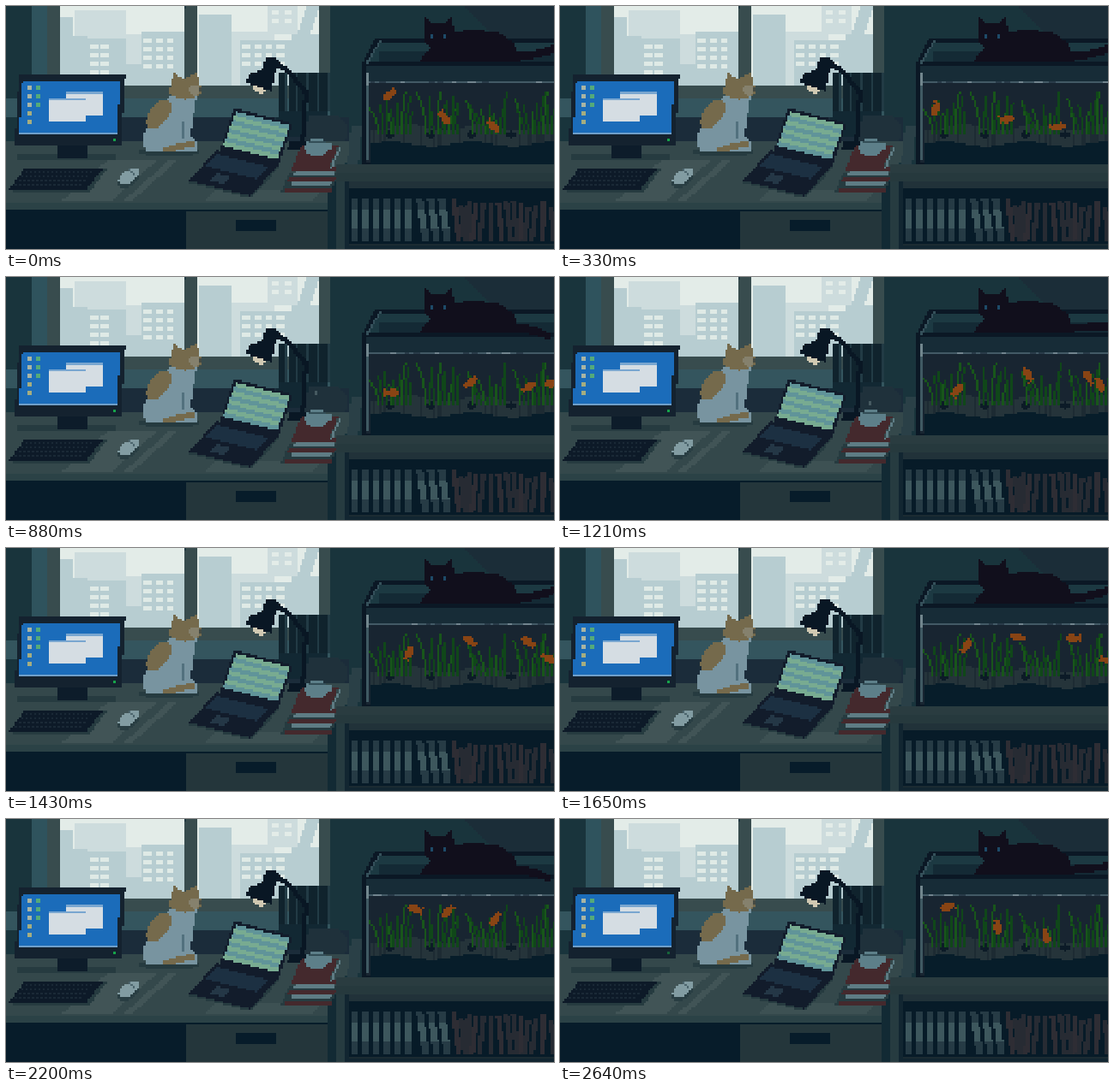
Animation of 639x284 px, one loop 2750 ms. Source, as an HTML page with a canvas:

```html
<!DOCTYPE html>
<html lang="en">
<meta charset="utf-8">
<title>Office cats</title>
<style>
  html, body { margin: 0; width: 100%; height: 100%; overflow: hidden; background: #19333c }
  canvas { display: block; width: 640px; height: 285px; image-rendering: pixelated }
</style>
<canvas width="256" height="114"></canvas>
<script>
const ctx = document.querySelector('canvas').getContext('2d');
const CELL = 2.5, STEP = 110, STEPS = 25, TAU = Math.PI * 2;
const snap = v => Math.round(v / CELL);
const noise = n => { const v = Math.sin(n * 12.9898) * 43758.5453; return v - Math.floor(v); };
const repeat = (n, draw) => { for (let k = 0; k < n; k++) draw(k); };

// Coordinates are stage pixels, snapped to the coarse pixel grid.
function box(color, x, y, w = CELL, h = CELL) {
  ctx.fillStyle = color;
  const left = snap(x), top = snap(y);
  ctx.fillRect(left, top, Math.max(1, snap(x + w) - left), Math.max(1, snap(y + h) - top));
}
function poly(color, ...p) {
  ctx.fillStyle = color;
  for (let row = 0; row < 114; row++) {
    const y = (row + .5) * CELL, hits = [];
    for (let k = 0; k < p.length; k += 2) {
      const x1 = p[k], y1 = p[k + 1], x2 = p[(k + 2) % p.length], y2 = p[(k + 3) % p.length];
      if ((y1 > y) !== (y2 > y)) hits.push(x1 + (y - y1) / (y2 - y1) * (x2 - x1));
    }
    hits.sort((a, b) => a - b);
    for (let k = 0; k + 1 < hits.length; k += 2) {
      const left = snap(hits[k]);
      ctx.fillRect(left, row, snap(hits[k + 1]) - left, 1);
    }
  }
}
// Parallelogram: the lower edge moves by lean, the right edge by drop.
function slab(color, x, y, w, h, lean, drop = 0) {
  poly(color, x, y, x + w, y + drop, x + w + lean, y + h + drop, x + lean, y + h);
}
function oval(color, x, y, rx, ry, angle = 0) {
  const c = Math.cos(angle), s = Math.sin(angle), points = [];
  for (let a = 0; a < TAU; a += TAU / 16) {
    const u = rx * Math.cos(a), v = ry * Math.sin(a);
    points.push(x + u * c - v * s, y + u * s + v * c);
  }
  poly(color, ...points);
}
function line(color, x1, y1, x2, y2, size = CELL) {
  const n = Math.ceil(Math.max(Math.abs(x2 - x1), Math.abs(y2 - y1)) / CELL);
  repeat(n + 1, k => box(color, x1 + (x2 - x1) * k / n, y1 + (y2 - y1) * k / n, size, size));
}
function building(color, x, y, w, cols = 0, rows = 0) {
  box(color, x, y, w, 92.5 - y);
  repeat(cols * rows, k => box('#dfeae6', x + 4 + k % cols * 13, y + 6 + Math.floor(k / cols) * 10, 9, 5));
}

function room() {
  const frame = '#384c4e', near = '#b7cdd1', far = '#cddcdd';
  box('#19343c', 0, 0, 640, 285);
  poly('#1b2d38', 535, 0, 640, 0, 640, 38, 572, 38);
  box('#2f535d', 30, 0, 18, 130);
  box(frame, 48, 0, 330, 108);
  box('#34555e', 0, 108, 378, 21);
  box('#1b2c3a', 130, 129, 270, 34);

  box('#e3ece8', 62.5, 0, 302.5, 92.5);
  building(far, 80, 5, 60);
  building(near, 62.5, 35, 32);
  box(near, 62.5, 12, 14, 25);
  building(near, 94, 38, 46, 2, 4);
  building(far, 140, 33, 18);
  building(near, 122, 67, 36);
  building(near, 157, 31, 51, 3, 4);
  building(far, 263, 31, 50);
  building(near, 225, 10, 38);
  building(near, 272, 40, 60, 4, 3);
  box(far, 305, 0, 35, 32);
  repeat(4, k => box('#e3ece8', 311 + k % 2 * 14, 6 + (k >> 1) * 10, 7, 5));
  building(near, 332, 32, 33);
  slab(near, 350, 0, 15, 32, -10);
  box(frame, 207.5, 0, 15, 100);
  box('#223942', 207.5, 0);

  // desk
  poly('#34484b', 0, 157, 415, 157, 385, 197, 376, 230, 0, 230);
  slab('#415456', 118, 180, 82, 48, -54);
  slab('#34484b', 176, 180, 14, 48, -54);
  slab('#3d5153', 245, 215, 125, 13, -14);
  slab('#2a4047', 402, 140, 13, 54, -5);
  box('#2b4246', 0, 229, 376, 8.5);
  box('#071c2a', 0, 237.5, 386, 48);
  box('#24363b', 210, 240, 165, 45);
  box('#071c2a', 267, 251, 48, 11);
  box('#122a34', 375, 205, 11, 80);
}

function computer(i) {
  box('#263b40', 13, 173, 114, 7);
  box('#0d1c2a', 59, 162, 36, 15);
  slab('#14222f', 15, 80, 124, 82, -5);
  slab('#1b6cba', 19, 87, 114, 62, -4);
  box('#6f9fca', 16, 148, 114);
  repeat(2, k => {
    const x = 70 - k * 20, y = 100 + k * 8;
    box('#79a6d0', x, y, 42, 28);
    box('#d5dde3', x, y + 3, 42, 25);
  });
  const palette = ['#a9b4a3', '#55aa79', '#b77b6c'];
  repeat(8, k => k < 6 ? box(palette[(k + (k >> 1)) % 3], 26 + k % 2 * 10, 93 + (k >> 1) * 10, 5, 5)
    : box('#a5ad80', 24, 123 + (k - 6) * 10, 5, 5));
  box(i % 5 < 4 ? '#16a34a' : '#17633a', 125, 156);

  slab('#263b40', 26, 191, 91, 26, -20);
  slab('#0d1a28', 22, 189, 91, 25, -19);
  repeat(64, k => box('#1a2936', 22 + k % 16 * 5 - (k >> 4) * 4, 192 + (k >> 4) * 5));
  oval('#293e43', 143, 202, 14, 8, -.6);
  oval('#829ca2', 143, 199, 14, 7, -.6);
  line('#4d666e', 143, 190, 148, 196);
}

function paleCat() {
  const white = '#7894a0', tan = '#756a4c';
  oval('#263b40', 190, 170, 36, 6);
  poly(white, 192, 104, 222, 104, 215, 150, 223, 161, 223, 169, 162, 169, 159, 153, 174, 120);
  oval(tan, 178, 126, 20, 11, -.95);
  oval(tan, 209, 98, 19, 11);
  poly(tan, 191, 96, 196, 77, 207, 86, 222, 77, 227, 96);
  oval('#85816d', 220, 98, 7, 6);
  box('#454a43', 225, 95, CELL, 5);
  line(tan, 182, 165, 213, 158, 6);
  line('#52717e', 204, 135, 206, 153);
}

function deskThings(i) {
  const dark = '#091724', cover = '#44292d', pages = '#5e7c84';
  repeat(5, k => {
    box('#10232d', 317 + k * 12, 77, 11, 48);
    box('#223b45', 326 + k * 12, 77, CELL, 46);
  });
  slab('#122833', 318, 123, 58, 30, -8);
  poly('#1f313b', 354, 127, 387, 127, 398, 140, 396, 157, 345, 157);

  // lamp
  line(dark, 311, 61, 330, 77, 5);
  line(dark, 328, 75, 348, 100, 5);
  line(dark, 347, 98, 343, 160, 5);
  oval('#d1c9b2', 295, 96, 8, 5, .4);
  poly(dark, 303, 61, 316, 61, 318, 70, 312, 82, 310, 100, 280, 89, 284, 79, 298, 74);
  slab(dark, 331, 157, 23, 11, -3);

  // laptop
  slab('#263b40', 245, 170, 74, 36, -34, 18);
  slab('#121c2b', 266, 119, 68, 50, -17, 18);
  slab('#121c2b', 245, 168, 72, 36, -32, 18);
  slab('#1c3042', 246, 173, 60, 14, -14, 15);
  slab('#243746', 246, 195, 16, 9, -8, 4);
  repeat(8, k => {
    const color = (k + (i % 5 > 2)) % 2 ? '#78ab91' : '#609499';
    slab(color, 268 - k * 1.9, 123 + k * 5, 63, 5, -1.9, 16);
  });

  // books and mug
  slab('#263b40', 330, 195, 58, 22, -10);
  repeat(3, k => {
    const y = 212 - k * 12, x = 326 + k * 4;
    slab(cover, x, y, 55, 5, -2);
    if (k) slab(pages, x + 3, y + 5, 47, 5, -2);
  });
  slab(cover, 345, 162, 43, 27, -12);
  slab(pages, 388, 165, CELL, 24, -10);
  oval('#5d7f89', 362, 165, 14, 11);
  box('#5d7f89', 375, 160, 5, 8);
  box('#334e57', 353, 157, 20);
  if (i > 6 && i < 13) box('#465a61', 361, 132 + (i - 8) * 4, CELL, 5);
}

// Positions at equal steps round a closed loop
const fishLoops = [
  [[447, 104], [437, 130], [460, 134], [474, 114], [477, 105]],
  [[511, 130], [529, 130], [546, 117], [533, 104], [515, 108]],
  [[568, 140], [591, 138], [617, 121], [598, 105], [570, 117]],
  [[665, 120], [650, 124], [630, 125], [638, 131], [660, 132]]
];
function along(loop, i) {
  const n = loop.length, s = (i / STEPS + 1) * n, k = Math.floor(s), u = s - k;
  const [a, b, c, d] = [-1, 0, 1, 2].map(o => loop[(k + o) % n]);
  return [0, 1].map(j => b[j] + u / 2 * (c[j] - a[j]
    + u * (2 * a[j] - 5 * b[j] + 4 * c[j] - d[j] + u * (3 * (b[j] - c[j]) + d[j] - a[j]))));
}
function fish(loop, i) {
  const color = '#884414', [x, y] = along(loop, i), [x2, y2] = along(loop, i + .3);
  const angle = Math.atan2(y2 - y, x2 - x), c = Math.cos(angle), s = Math.sin(angle);
  oval(color, x + c, y + s, 8, 4.5, angle);
  poly(color, x - 4 * c, y - 4 * s, x - 9 * c - 5 * s, y - 9 * s + 5 * c, x - 9 * c + 5 * s, y - 9 * s - 5 * c);
}

function tank(i) {
  const edge = '#0b1825';
  poly(edge, 415, 67, 431, 37, 640, 37, 640, 186, 415, 186);
  poly('#1c3942', 423, 65, 435, 42, 640, 42, 640, 65);
  box('#142a35', 436, 53, 204, 12);
  line('#35505a', 419, 66, 434, 40);
  box('#172c37', 420, 71, 220, 18);
  box('#182531', 420, 89, 220, 93);
  for (let x = 425; x < 640; x += CELL) {
    const top = 142 + 4 * Math.sin(x / 13), floor = 161 + 3 * Math.sin(x / 15);
    box(noise(x) < .25 ? '#1d2b33' : '#25343a', x, top, CELL, 40);
    box('#071d2a', x, floor, CELL, 184 - floor);
  }
  repeat(4, k => oval('#0c1b27', 448 + k * 47, 150, 6, 4));

  repeat(36, k => {
    const clump = Math.floor(k / 9), offset = k % 9 - 4;
    const x = 451 + clump * 55 + offset * 4.5, height = 20 + noise(k + 4) * 30;
    const bend = offset * 1.5 + (noise(k * 3) - .5) * 12;
    for (let h = 0; h < height; h += CELL) {
      const f = h / height, sway = Math.sin(i / 5 * TAU + k) * f * 1.3;
      box(k % 3 ? '#104719' : '#18561a', x + bend * f * f + sway, 148 - h);
    }
  });
  fishLoops.forEach(loop => fish(loop, i));

  box('#435a66', 421, 87.5, 219);
  repeat(10, k => box(k % 2 ? '#71848e' : '#293b49', 424 + (noise(k) * 210 + i * 5) % 210, 87.5, 7));
  box('#3f5962', 420, 78, CELL, 102);
  box('#71868d', 420, 78, CELL, 15);
}

function blackCat(i) {
  const fur = '#110f1c', swing = Math.cos(TAU * 2 * (i - 1.5) / STEPS);
  poly(fur, 488, 13, 496, 19, 511, 19, 519, 12, 523, 30, 545, 27, 575, 31, 592, 43, 601, 66, 480, 66, 494, 49, 488, 41);
  repeat(20, k => {
    const f = k / 19;
    box(fur, 585 + f * (48 + swing * 4), 54 - swing * 11 * f * f, 6, 10 - f * 2);
  });
  if (i % 10 !== 5) repeat(2, k => box('#1d4a68', 495 + k * 14, 32, CELL, 5));
}

function shelf() {
  box('#2a3c40', 385, 186, 255, 8);
  box('#26393d', 385, 194, 255, 11);
  box('#122631', 385, 205, 255, 80);
  box('#263b40', 386, 206, 9, 79);
  box('#071b28', 400, 213, 240, 64);
  box('#213239', 400, 206, 240, 7);
  box('#1b2b32', 400, 277, 240, 4);
  repeat(9, k => {
    const x = 402 + k * 12.7, lean = k > 5 ? 7 : 0;
    slab('#263b45', x, 226, 8, 48, lean);
    slab('#3d575d', x + lean * .25, 238, 8, 23, lean * .5);
  });
  repeat(14, k => {
    const top = 226 + noise(k) * 8, lean = Math.round(Math.cos(k * .9) * 6);
    slab(k % 3 ? '#272b33' : '#2e2d34', 519 + k * 8.7, top, 6, 274 - top, lean);
  });
}

let shown = -1;
function play(now) {
  const i = Math.floor(now / STEP) % STEPS;
  if (i !== shown) {
    shown = i;
    room();
    computer(i);
    paleCat();
    deskThings(i);
    shelf();
    tank(i);
    blackCat(i);
  }
  requestAnimationFrame(play);
}
play(performance.now());
</script>
</html>
```
